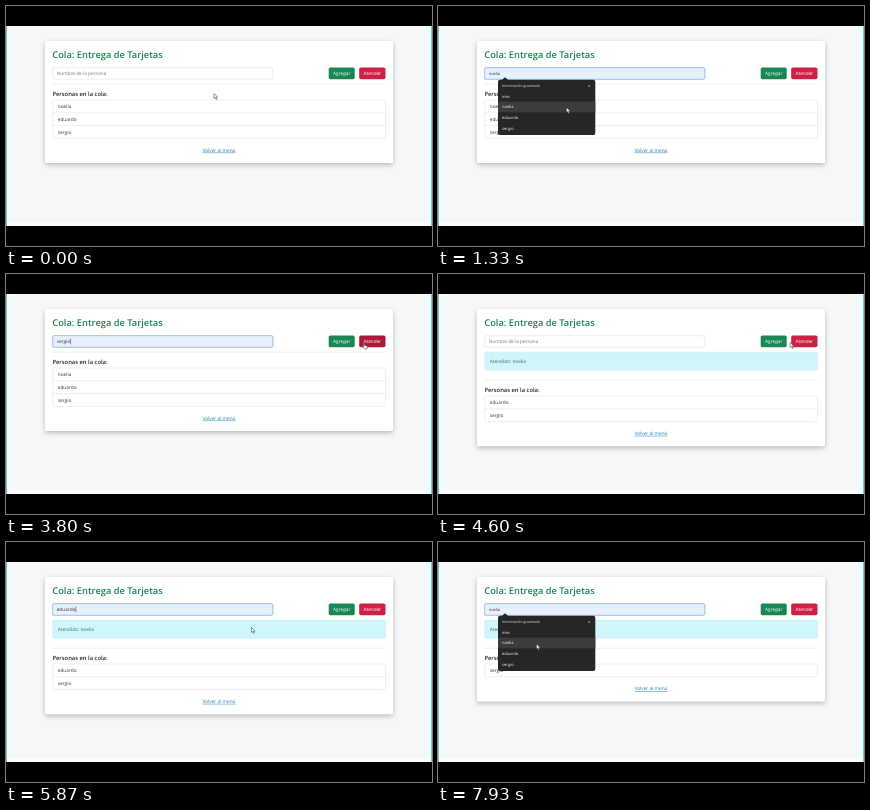
Write an HTML page that moves like this. It is 426 px wide and 240 px high and loops after 8 s.

```html
<!DOCTYPE html>
<html lang="es">
<head>
<meta charset="utf-8">
<title>Cola: Entrega de Tarjetas</title>
<style>
html, body { margin: 0; height: 100%; overflow: hidden; background: #000; }
svg { display: block; width: 100vw; height: 100vh; }
text { font: 4.75px "Open Sans", "Noto Sans", sans-serif; fill: #33373b; text-rendering: geometricPrecision; white-space: pre; }
.title { font-size: 9.3px; font-weight: 600; fill: #198754; }
.heading { font-size: 5.8px; font-weight: 600; fill: #212529; }
.button { fill: #fff; text-anchor: middle; }
.link { fill: #2581b8; text-anchor: middle; text-decoration: underline; }
.muted { fill: #747b81; }
.notice { fill: #3c6f79; }
.menu text { font-size: 4.1px; fill: #f1f1f1; }
.menu .caption { font-size: 3.65px; fill: #ddd; }
.line { stroke: #dcdfe2; stroke-width: .5; }
#card { filter: drop-shadow(0 2px 2.5px rgba(0, 0, 0, .24)); }
</style>
</head>
<body>
<svg viewBox="0 0 426 240" preserveAspectRatio="none">
  <rect width="426" height="240"/>
  <rect y="20" width="426" height="200" fill="#f6f7f9"/>
  <rect y="216" width="426" height="4" fill="#fafbfc"/>
  <path d="M.5 20V220M425.5 20V220" stroke="#63cfcb"/>
  <rect id="card" x="39" y="35" width="348" height="122" rx="1.5" fill="#fff"/>
  <text class="title" x="46.3" y="51.8">Cola: Entrega de Tarjetas</text>

  <rect id="glow" x="45.9" y="60.9" width="221.6" height="13" rx="2.4" fill="#b9d5fb"/>
  <rect id="input" x="46.7" y="61.7" width="220" height="11.5" rx="1.7" stroke-width=".6"/>
  <text id="value" x="50.7" y="69.1"></text>
  <path id="caret" stroke="#222" stroke-width=".5"/>
  <rect x="322.7" y="61.5" width="26" height="11.8" rx="1.7" fill="#198754"/>
  <text class="button" x="335.7" y="69.1">Agregar</text>
  <rect id="serve" x="353.2" y="61.5" width="26.3" height="11.8" rx="1.7"/>
  <text class="button" x="366.4" y="69.1">Atender</text>

  <g id="alert">
    <rect x="46.8" y="78.2" width="332.8" height="18" rx="1.7" fill="#cff6fb" stroke="#b4ebf3" stroke-width=".5"/>
    <text id="notice" class="notice" x="51.8" y="89"></text>
  </g>
  <g id="queue">
    <path class="line" d="M46.5 78.2H379.7"/>
    <text class="heading" x="46.4" y="89.6">Personas en la cola:</text>
    <rect id="list" class="line" x="46.7" y="94" width="332.8" rx="1.7" fill="#fff"/>
    <g id="rows"></g>
  </g>
  <text id="link" class="link" x="213">Volver al menú</text>

  <g id="menu" class="menu">
    <path d="M63.5 74.2L67 71.2L70.5 74.2Z" fill="#262626"/>
    <rect x="60" y="73.8" width="97.3" height="55.2" rx="2" fill="#262626"/>
    <rect id="hover" x="60" width="97.3" height="10.7" fill="#3c3c3c"/>
    <text class="caption" x="64" y="81.3">Información guardada</text>
    <path d="M150.2 79l2 2m0-2l-2 2" stroke="#ddd" stroke-width=".45"/>
    <g id="options"></g>
  </g>

  <g id="pointer">
    <path id="arrow" d="M0 0V5L1.2 4L2.1 6L3 5.6L2.1 3.7H3.7Z" fill="#fff" stroke="#333" stroke-width=".5"/>
    <path id="hand" d="M0 .3Q.6-.4 1 .3V2.3L3.3 2.9Q3.9 3.1 3.7 4L3.2 6H.9L-1 3.7Q-.8 2.9 0 3.4Z" fill="#fff" stroke="#333" stroke-width=".5"/>
    <path id="beam" d="M-1-2.5H1M0-2.5V2.5M-1 2.5H1" fill="none" stroke="#444" stroke-width=".5"/>
  </g>
</svg>
<script>
const LOOP = 8000, ROW = 12.8, FADE = 110;
const people = ["noelia", "eduardo", "sergio"];
const saved = ["ines", ...people];
const el = Object.fromEntries([...document.querySelectorAll("[id]")].map(e => [e.id, e]));
const set = (e, attrs) => Object.entries(attrs).forEach(([k, v]) => e.setAttribute(k, v));
const show = (e, on) => set(e, { visibility: on ? "visible" : "hidden" });

// Each step: start, form mode, chosen name, number of people served
const steps = [
  [0, "idle", "", 0],
  [820, "open", "", 0],
  [2620, "chosen", "sergio", 0],
  [4460, "idle", "", 1],
  [5030, "open", "", 1],
  [5600, "chosen", "eduardo", 1],
  [6550, "idle", "", 2],
  [7500, "open", "", 2]
];

// Pointer path: time, x, y
const path = [
  [0, 208, 87.5], [70, 208, 87.5], [500, 150, 78], [800, 118, 67], [950, 118, 67],
  [1330, 128.5, 101.5], [1800, 104, 118], [2400, 100, 121], [2670, 100, 121],
  [3400, 356, 69], [3530, 356, 69], [4330, 362, 69], [4420, 362, 69],
  [4600, 352.6, 68.5], [4950, 150, 67], [5100, 150, 67], [5450, 92, 110],
  [5650, 92, 110], [5870, 245, 85.5], [6250, 362, 68], [6600, 362, 68],
  [6930, 300, 60], [7200, 209.5, 53.5], [7450, 120, 67], [7600, 120, 67],
  [7850, 98.5, 102], [8000, 98.5, 102]
];

function slope(i, axis) {
  const [a, b, c] = [path[i - 1], path[i], path[i + 1]];
  if (!a || !c || (b[axis] - a[axis]) * (c[axis] - b[axis]) <= 0) return 0;
  return (c[axis] - a[axis]) / (c[0] - a[0]);
}

function pointerAt(t) {
  const i = path.findIndex((p, n) => n && t <= p[0]) - 1;
  const [a, b] = [path[i], path[i + 1]], d = b[0] - a[0], u = (t - a[0]) / d;
  return [1, 2].map(k =>
    a[k] + (b[k] - a[k]) * u * u * (3 - 2 * u) +
    d * u * (1 - u) * ((1 - u) * slope(i, k) - u * slope(i + 1, k)));
}

const inside = (x, y, l, t, r, b) => x >= l && x <= r && y >= t && y <= b;

function layout(served) {
  const shift = served ? 28 : 0, count = people.length - served;
  const bottom = 94 + shift + count * ROW;
  show(el.alert, served > 0);
  el.notice.textContent = served ? "Atendido: " + people[served - 1] : "";
  set(el.queue, { transform: `translate(0 ${shift})` });
  set(el.list, { height: count * ROW });
  set(el.card, { height: bottom + 24.6 - 35 });
  set(el.link, { y: bottom + 13.2 });
  el.rows.innerHTML = people.slice(served).map((name, i) =>
    (i ? `<path class="line" d="M46.7 ${94 + i * ROW}H379.5"/>` : "") +
    `<text x="51.8" y="${102 + i * ROW}">${name}</text>`).join("");
}

el.options.innerHTML = saved.map((name, i) =>
  `<text x="64" y="${91.8 + i * 10.6}">${name}</text>`).join("");

let shownServed = -1;

function draw(t) {
  const [start, mode, chosen, served] = steps.findLast(s => s[0] <= t);
  const [x, y] = pointerAt(t), age = t - start;
  if (served !== shownServed) layout(shownServed = served);

  const open = mode === "open", focused = mode !== "idle";
  const over = inside(x, y, 60, 85, 157, 128) ? Math.min(3, Math.floor((y - 85) / 10.6)) : -1;
  const option = open ? over : saved.indexOf(chosen);
  const preview = open && over >= 0;
  const text = preview ? saved[over] : chosen;

  show(el.glow, focused);
  set(el.input, {
    fill: text ? "#e8f0fe" : "#fff",
    stroke: focused ? "#8ab8f5" : "#dee2e6"
  });
  el.value.textContent = text || "Nombre de la persona";
  el.value.setAttribute("class", text ? "" : "muted");
  el.value.style.fontSize = preview ? "4px" : "";
  const caretX = chosen ? 51.1 + el.value.getComputedTextLength() : 50.6;
  set(el.caret, { d: `M${caretX} 64.6V70.4` });
  show(el.caret, focused && !preview && age % 1060 < 530);

  const fade = open ? 1 : mode === "chosen" ? Math.max(0, 1 - age / FADE) : 0;
  const scale = .96 + .04 * fade;
  set(el.menu, {
    opacity: fade,
    transform: `translate(108.6 101.4) scale(${scale}) translate(-108.6 -101.4)`
  });
  set(el.hover, { y: 85 + option * 10.6, opacity: option < 0 ? 0 : 1 });

  const onServe = inside(x, y, 352.5, 61.5, 379.5, 73.3);
  const onButton = onServe || inside(x, y, 322.7, 61.5, 348.7, 73.3);
  const onInput = inside(x, y, 46.7, 61.7, 266.7, 73.2);
  set(el.serve, { fill: onServe ? "#ae1839" : "#cb2145" });
  set(el.pointer, { transform: `translate(${x} ${y})` });
  show(el.hand, onButton);
  show(el.beam, onInput);
  show(el.arrow, !onButton && !onInput);
}

const begin = performance.now();
function tick() {
  draw((performance.now() - begin) % LOOP);
  requestAnimationFrame(tick);
}
tick();
</script>
</body>
</html>
```
